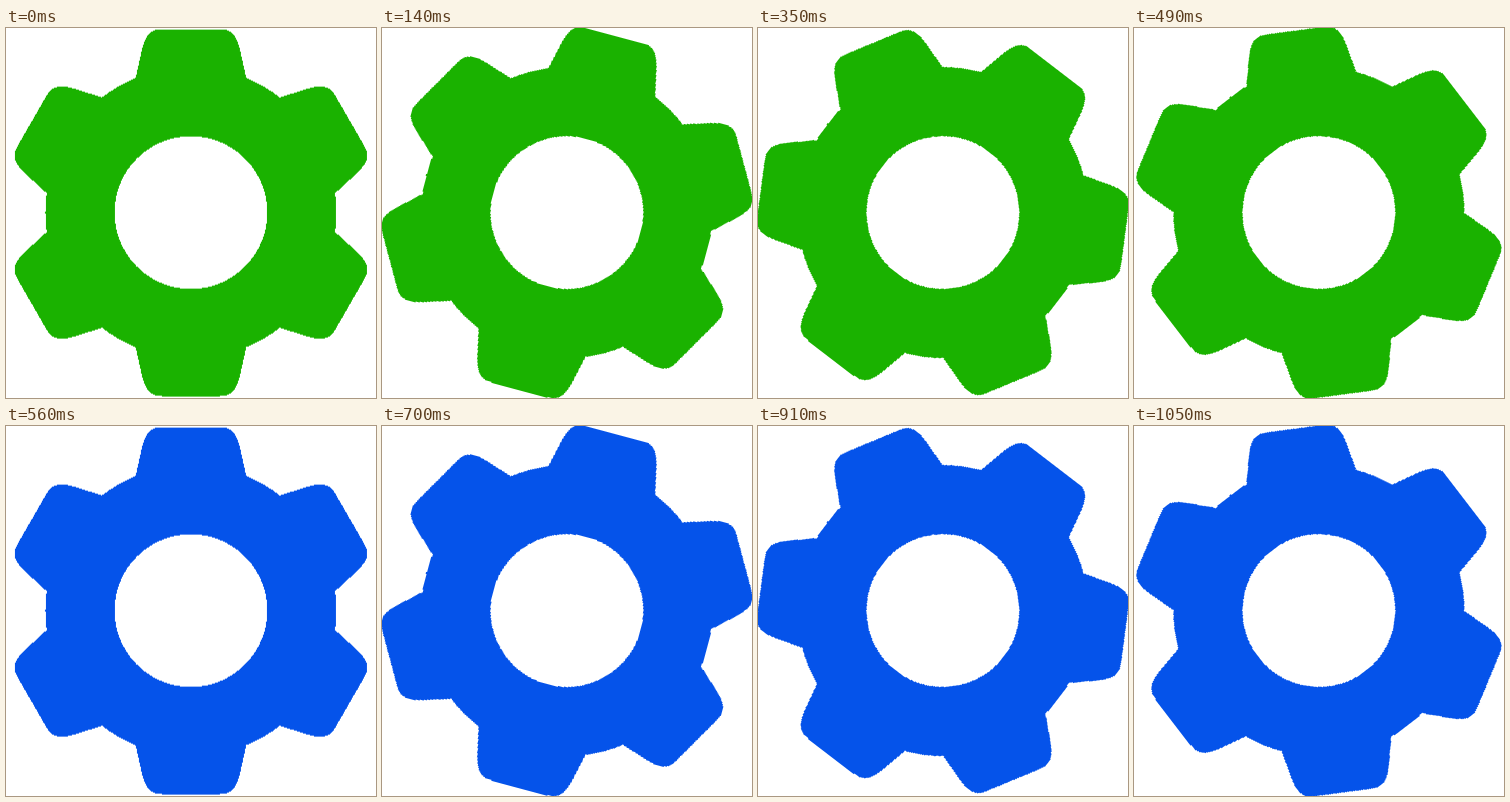
Write an HTML page that moves like this. It is 370 px wide and 370 px high and loops after 1120 ms.

```html
<!DOCTYPE html>
<html lang="en">
<head>
<meta charset="utf-8">
<title>Turning gear</title>
<style>
  html, body { margin: 0; width: 100%; height: 100%; overflow: hidden; background: #fff; }
  svg { display: block; width: 370px; height: 370px; }
  #gear {
    fill: #1ab200;
    fill-rule: evenodd;
    shape-rendering: crispEdges;
    animation: turn 560ms steps(8, end) infinite, tint 1120ms steps(1, end) infinite;
  }
  @keyframes turn { to { transform: rotate(60deg); } }
  @keyframes tint { 0% { fill: #1ab200; } 50%, 100% { fill: #0553ea; } }
</style>
</head>
<body>
<svg viewBox="-184.9 -184.6 370 370"><path id="gear"/></svg>
<script>
  const TEETH = 6, ROOT = 145.5, HOLE = 76.4;

  // Left half of the upright tooth: base, end of flank, two handles, start of flat tip
  const half = [[-55.3, -134.6], [-49, -163], [-45.5, -178], [-40, -183.5], [-29, -183.5]];
  const mirrored = half.map(([x, y]) => [-x, y]).reverse();

  function tooth(i) {
    const a = i * 2 * Math.PI / TEETH, c = Math.cos(a), s = Math.sin(a);
    const at = ([x, y]) => `${(x * c - y * s).toFixed(2)} ${(x * s + y * c).toFixed(2)}`;
    const l = half.map(at), r = mirrored.map(at);
    const start = i ? `A${ROOT} ${ROOT} 0 0 1 ${l[0]}` : `M${l[0]}`;
    return `${start}L${l[1]}C${l.slice(2)}L${r[0]}C${r.slice(1, 4)}L${r[4]}`;
  }

  const rim = Array.from({ length: TEETH }, (_, i) => tooth(i)).join('');
  const close = `A${ROOT} ${ROOT} 0 0 1 ${half[0].join(' ')}Z`;
  const hole = `M${-HOLE} 0a${HOLE} ${HOLE} 0 1 0 ${2 * HOLE} 0a${HOLE} ${HOLE} 0 1 0 ${-2 * HOLE} 0Z`;
  document.getElementById('gear').setAttribute('d', rim + close + hole);
</script>
</body>
</html>
```
